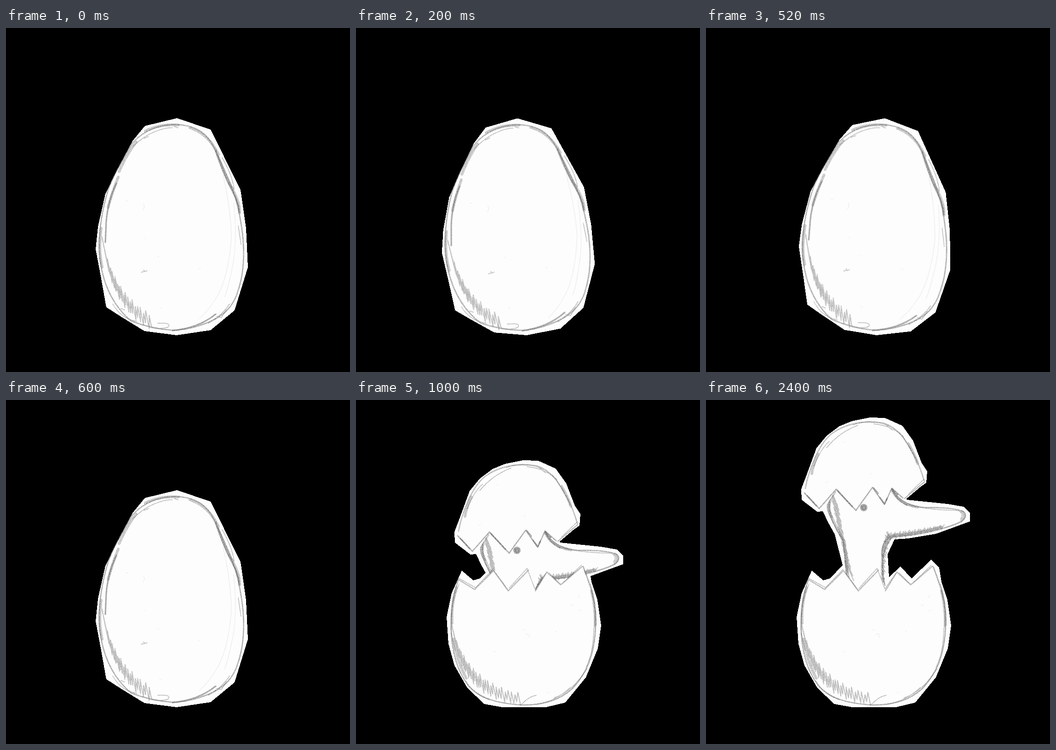
An HTML page that plays this animation: 748x748 px, repeating every 3.2 s.

```html
<!DOCTYPE html>
<html lang="en">
<head>
<meta charset="utf-8">
<title>Hatching egg</title>
<style>
  html, body { margin: 0; width: 100%; height: 100%; overflow: hidden; background: #000; }
  svg { display: block; width: 100vw; height: 100vh; }
  .scene { display: none; }
  .paper { fill: #fdfdfd; shape-rendering: crispEdges; }
  .cover { fill: #fdfdfd; }
  .pencil { filter: url(#grain); fill: none; stroke: #555; stroke-linecap: round; stroke-linejoin: round; }
  .faint { stroke-width: 1.3; opacity: .12; }
  .thin { stroke-width: 1.5; opacity: .48; }
  .line { stroke-width: 2.6; opacity: .55; }
  .light { stroke-width: 2.6; opacity: .45; }
  .soft { stroke-width: 6; opacity: .36; }
  .dark { stroke-width: 3.2; opacity: .6; }
  .hatch { stroke-width: 1.9; opacity: .45; }
</style>
</head>
<body>
<svg viewBox="0 0 748 748">
  <filter id="grain" filterUnits="userSpaceOnUse" x="0" y="0" width="748" height="748" color-interpolation-filters="sRGB">
    <feTurbulence type="fractalNoise" baseFrequency=".6" numOctaves="2" seed="4"/>
    <feColorMatrix values="0 0 0 0 0  0 0 0 0 0  0 0 0 0 0  2 0 0 0 -.15"/>
    <feComposite in="SourceGraphic" operator="in"/>
  </filter>

  <g class="scene" id="whole">
    <path class="paper" d="M372 196L445 221L510 352L522 435L526 520L497 614L445 657L371 668L301 659L249 627L218 607L207 545L195 481L200 432L216 361L240 312L275 246L302 213Z"/>
    <g class="pencil">
      <path class="line" d="M275 250C300 222 335 209 371 210C420 212 442 235 456 268C480 320 502 360 511 425C519 470 520 525 505 570C495 605 475 625 440 640C410 652 385 657 360 657C330 655 300 648 272 637C235 606 211 560 204 500C200 460 206 410 217 370C225 335 245 300 275 250"/>
      <path class="soft" d="M303 224Q335 208 375 211M400 217Q440 230 462 275M457 268Q475 320 492 350T508 402M283 248Q262 275 246 312M244 324Q230 360 222 390M207 435Q200 480 209 520"/>
      <path class="dark" d="M456 265Q472 315 490 350T507 400M240 338Q222 375 218 420L216 466M362 658Q420 652 456 622"/>
      <path class="thin" d="M276 258Q298 236 322 226T362 217M300 240L310 236M366 214L374 217M470 282Q492 320 496 350L489 343M330 642Q360 640 353 650Q340 655 318 652M232 600Q250 632 284 638M250 610L258 613M480 612L468 630L458 627M486 600Q470 625 440 642M505 430L511 470"/>
      <path class="faint" d="M472 320Q490 400 490 460Q482 550 455 590Q440 615 420 632M495 380Q505 470 490 530Q482 570 475 585"/>
      <path class="thin" d="M294 531L307 528M299 526L303 530"/>
      <path class="faint" d="M299 383q4 6-1 13M262 376h3M419 524l4-2M330 497h2M302 458h2M334 606l3 3"/>
      <path class="hatch" data-hatch="213 475 232 594 314 638 26 5 25 .7"/>
    </g>
  </g>

  <g class="scene" id="cracked">
    <path class="paper" d="M358 197L415 205L461 245L492 318L518 382L525 477L507 579L445 648L360 668L283 643L249 635L208 566L197 475L206 392L240 288L272 239L317 206Z"/>
    <g class="pencil">
      <path class="line" d="M227 370C240 305 258 252 295 225C320 205 380 203 420 214C450 226 462 262 478 300C500 345 514 400 518 450C520 510 505 570 485 595C450 635 400 648 345 650C290 645 255 618 235 585C212 545 204 500 209 455C212 420 220 395 227 370"/>
      <path class="thin" d="M236 345C246 295 262 255 290 234C325 211 385 210 422 220C446 232 458 262 474 296M318 213Q360 202 404 210M405 230Q420 234 438 235M507 405L514 440Q518 520 502 562M508 415L513 400M498 570Q470 618 410 634Q375 643 350 643M485 602Q440 645 350 653"/>
      <path class="soft" d="M258 282Q240 325 232 362M213 425Q205 480 218 525M448 240Q468 280 478 305M515 450Q517 500 510 530M290 628Q320 645 360 648"/>
      <path class="line" d="M226 369L262 397L299 353L334 401L377 351L395 396L420 355L445 386L490 346"/>
      <path class="dark" d="M466 365L490 346M318 383L335 400M264 394L281 374M338 396L358 374M380 360L389 382M397 392L409 372M430 370L445 385"/>
      <path class="faint" d="M230 440L250 432L275 445L325 425M338 415L350 435L375 415L385 438L412 412L435 418M445 365L480 335M480 403L512 440M284 438a4 4 0 1 0 8 0a4 4 0 1 0-8 0"/>
      <path class="thin" d="M458 612v-8h4M463 604h1"/>
      <path class="faint" d="M435 293q6 1 5-5M449 317q6 3 8-1M372 236h4M254 513h3M370 490h3M276 549h2M428 514h2"/>
      <path class="hatch" data-hatch="219 485 235 620 355 645 34 3 30 .25"/>
    </g>
  </g>

  <g class="scene" id="open">
    <path class="paper" d="M230 371L255 392L270 388L297 359L330 395L396 387L423 362L447 388L490 347L507 365L512 395L525 435L533 490L526 540L500 603L455 658L413 668L318 668L279 661L242 626L214 577L201 530L197 472L208 420Z"/>
    <g class="bird">
      <path class="paper" d="M242 243L254 242L266 267L280 292L297 359L297 420L398 420L398 385L395 335L410 303L440 301L500 291L574 264L574 245L560 232L525 226L437 217L404 180L283 180Z"/>
      <g class="pencil">
        <path class="line" d="M268 212Q260 232 268 248Q284 285 298 305Q302 340 305 380Q312 400 325 408M404 193Q425 232 480 234Q540 233 560 243Q570 252 556 264Q530 277 480 288Q440 296 405 297Q388 320 384 345Q382 375 389 403"/>
        <path class="soft" d="M280 200Q262 225 270 247Q286 285 301 308L309 385M405 197Q420 226 460 233M384 395Q382 350 386 322Q393 299 410 294Q460 292 512 276M556 242Q566 250 556 262"/>
        <path class="dark" d="M404 193Q414 218 436 228M270 213Q264 235 274 255M303 350L308 375M383 340Q381 320 390 306"/>
        <path class="thin" d="M436 228Q490 240 548 240Q562 248 553 259"/>
        <path class="hatch" data-hatch="279 213 290 280 314 376 30 9 21 .8"/>
        <path class="hatch" data-hatch="394 297 450 290 515 276 30 5 -8 .6"/>
        <path class="hatch" data-hatch="398 293 386 315 385 392 18 4 8 .8"/>
        <circle cx="343" cy="234" r="8" fill="#777" stroke="none" opacity=".75"/>
        <circle cx="343" cy="234" r="4" class="line"/>
      </g>
    </g>
    <path class="cover" d="M222 392L258 412L299 371L331 415L375 370L390 415L415 374L445 402L492 362C508 400 522 440 521 490C519 550 505 590 470 628C440 655 400 664 360 663C310 660 270 650 245 622C220 590 205 540 207 480C208 440 214 415 222 392Z"/>
    <g class="pencil">
      <path class="line" d="M494 362C508 400 524 440 521 490C519 550 505 590 470 628C440 655 400 664 360 663C310 660 270 650 245 622C220 590 205 540 207 480C208 440 214 415 222 392"/>
      <path class="light" d="M222 390L258 412L299 371L331 415L375 370M390 415L415 374L445 402L492 362"/>
      <path class="thin" d="M224 388L260 408L298 368M305 378L329 411M333 409L372 366L389 411L412 378M420 376L444 400M452 396L490 359M510 400Q524 455 517 500Q516 550 500 582M502 585Q470 635 430 648M466 625Q435 655 392 662M360 662Q375 645 392 642M224 400Q204 445 207 505L216 545M238 610Q256 640 290 652"/>
      <path class="soft" d="M219 408Q207 440 209 485M512 415Q521 450 520 490M212 520Q220 570 240 605"/>
      <path class="faint" d="M370 511a4 4 0 1 1 5 5M468 445l5 3M483 430l4-6M485 458h3M299 548l5-2M415 637l4-2M363 500h2M434 503h2"/>
      <path class="hatch" data-hatch="213 510 235 628 355 650 33 6 27 .45"/>
    </g>
    <g class="bird">
      <path class="paper" d="M356 38L389 39L427 56L450 88L469 137L481 155L479 180L465 190L432 218L404 192L388 227L362 190L326 240L283 194L254 242L242 243L208 217L207 194L218 165L240 105L262 78L290 57L317 46Z"/>
      <g class="pencil">
        <path class="light" d="M216 192C224 150 245 95 275 72C310 48 350 45 385 50C425 62 440 100 455 125C465 145 470 160 475 178L432 214"/>
        <path class="thin" d="M234 145Q250 105 268 90M262 104Q290 70 330 55M320 54Q360 38 400 58M365 52Q405 56 430 80M392 55L406 66M420 70Q445 100 458 135M474 172L440 205"/>
        <path class="soft" d="M244 118Q233 140 230 160M440 95Q455 120 460 138"/>
        <path class="line" d="M214 202L246 236L283 194L326 240L362 190L388 227L404 192L428 213"/>
        <path class="dark" d="M220 208L240 230M286 197L318 232M364 191L374 203M378 212L388 226L394 214M405 193L416 206"/>
        <path class="faint" d="M260 180l4-2M358 160h3M300 92h2"/>
      </g>
    </g>
  </g>
</svg>
<script>
  const STEP = 200, LOOP = 3200;
  const tilts = [0, -2.55, 2.06, 0];
  const get = id => document.getElementById(id);
  const scenes = ['whole', 'cracked', 'open'].map(get);
  const birds = document.querySelectorAll('.bird');

  // Zigzag along a quadratic curve; (vx, vy) is half a stroke, shrinking to `taper`.
  function zigzag([x0, y0, cx, cy, x1, y1, count, vx, vy, taper]) {
    const along = (a, b, c, t) => (1 - t) ** 2 * a + 2 * t * (1 - t) * b + t * t * c;
    let d = '';
    for (let i = 0; i < count; i++) {
      const t = i / (count - 1);
      const size = (1 + (taper - 1) * t) * (.85 + .3 * Math.sin(i * 2.4));
      const x = along(x0, cx, x1, t), y = along(y0, cy, y1, t);
      d += `${i ? 'L' : 'M'}${x - vx * size} ${y - vy * size}L${x + vx * size} ${y + vy * size}`;
    }
    return d;
  }

  for (const path of document.querySelectorAll('[data-hatch]'))
    path.setAttribute('d', zigzag(path.dataset.hatch.split(' ').map(Number)));

  function draw() {
    const step = Math.min(6, Math.floor(performance.now() % LOOP / STEP));
    const shown = step < 4 ? 0 : step < 5 ? 1 : 2;
    scenes.forEach((scene, i) => scene.style.display = i === shown ? 'inline' : 'none');
    scenes[0].setAttribute('transform', `rotate(${tilts[step] || 0} 371 668)`);
    const drop = step === 5 ? 'translate(7 93)' : '';
    birds.forEach(bird => bird.setAttribute('transform', drop));
    requestAnimationFrame(draw);
  }
  draw();
</script>
</body>
</html>
```
